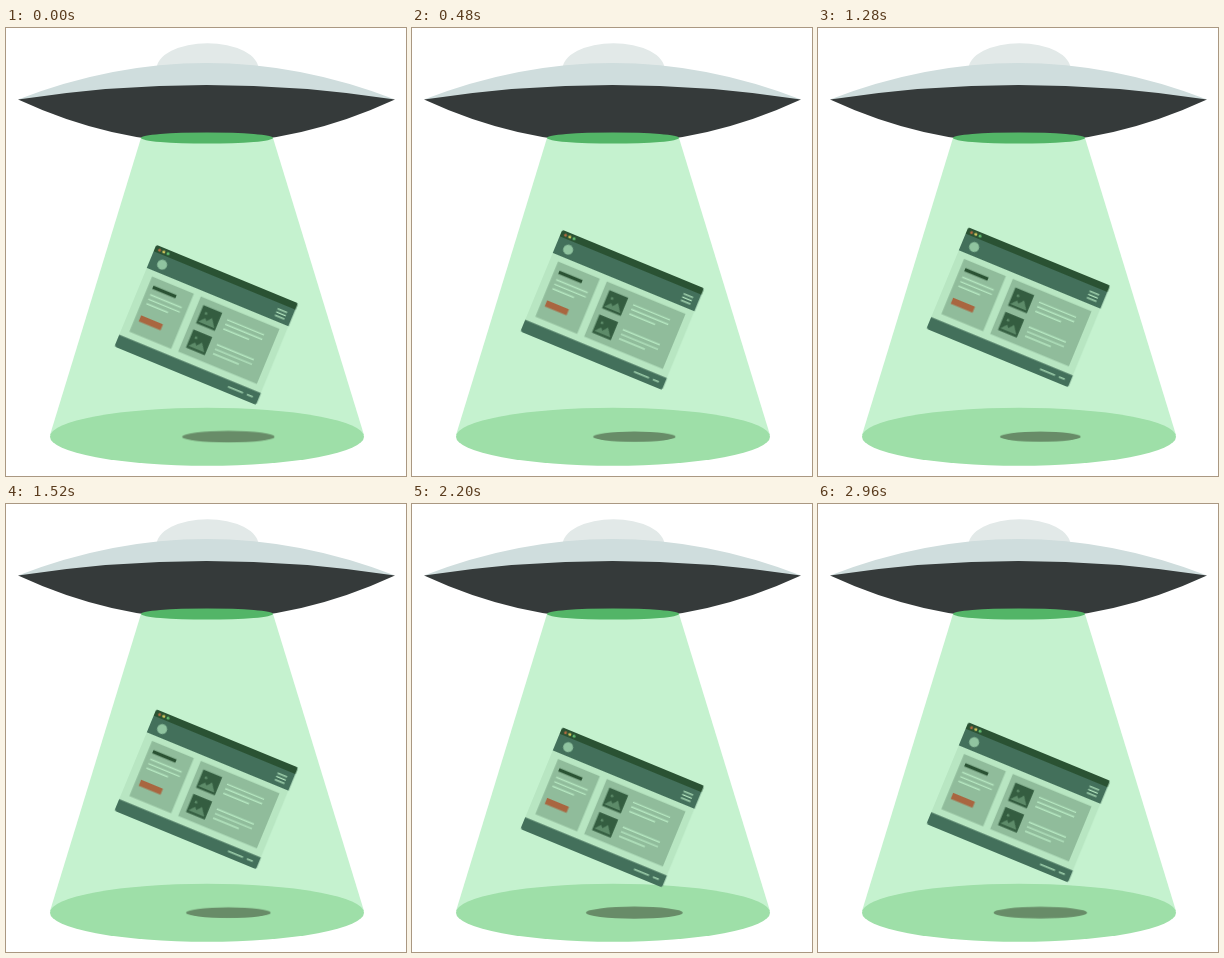
Animation, 400 px wide and 448 px high, one loop 3 s. Source, as an HTML page:

```html
<!DOCTYPE html>
<html lang="en">
<head>
<meta charset="utf-8">
<title>Abducted web page</title>
<style>
  html, body { margin: 0; width: 100%; height: 100%; overflow: hidden; background: #fff; }
  svg { display: block; width: 400px; height: 448px; }

  .float, .shadow {
    animation: 3000ms cubic-bezier(.5, 0, .5, 1) -540ms infinite;
  }
  .float { animation-name: float; }
  .shadow { animation-name: shrink; transform-origin: 222.4px 408.7px; }

  /* rise, sink slightly faster, rest briefly at the bottom */
  @keyframes float {
    0%, 96.667%, 100% { transform: translateY(0); }
    50% { transform: translateY(-27px); }
  }
  @keyframes shrink {
    0%, 96.667%, 100% { transform: scale(1); }
    50% { transform: scale(.815); }
  }

  .dark { fill: #2a5233; }
  .bar { fill: #43705b; }
  .panel { fill: #90bc9b; }
  .line { fill: none; stroke: #b6e8c1; stroke-width: 1.4; }
</style>
</head>
<body>
<svg viewBox="0 0 400 448">
  <defs>
    <clipPath id="frame"><rect width="153.5" height="110" rx="2.5"/></clipPath>
    <g id="picture">
      <rect width="20.3" height="19.6" fill="#345d40"/>
      <circle cx="5.6" cy="6.8" r="1.4" fill="#5d8b69"/>
      <path d="M1.5 17.2L6.5 11.5L9 13.8L13 8.8L18.8 17.2Z" fill="#5d8b69"/>
    </g>
  </defs>

  <path d="M135 110H267L358 407H44Z" fill="#c5f2cf"/>
  <ellipse cx="201" cy="408.7" rx="157" ry="29" fill="#9edfa8"/>
  <ellipse class="shadow" cx="222.4" cy="408.7" rx="48.6" ry="6.1" fill="#688c68"/>

  <ellipse cx="201.5" cy="41" rx="51" ry="25.7" fill="#e2e9e8"/>
  <path d="M12 71.5Q200.5 -1.5 389 71.5Z" fill="#cfdddd"/>
  <path d="M12 71.5Q200.5 42.5 389 71.5Q200.5 158.5 12 71.5Z" fill="#353a3a"/>
  <ellipse cx="201" cy="110" rx="66" ry="5.6" fill="#53b567"/>

  <g class="float">
    <g transform="translate(150.3 223.8) rotate(22.4)">
      <g clip-path="url(#frame)">
        <rect width="153.5" height="110" fill="#b8e6c2"/>
        <rect class="bar" width="153.5" height="25"/>
        <rect class="dark" width="153.5" height="7"/>
        <rect class="bar" y="97.3" width="153.5" height="13"/>
      </g>
      <circle cx="5.1" cy="3.7" r="1.5" fill="#b0693f"/>
      <circle cx="9.7" cy="3.7" r="1.5" fill="#cfc45c"/>
      <circle cx="14.3" cy="3.7" r="1.5" fill="#62bd70"/>

      <circle cx="13" cy="16.3" r="5" fill="#90c4a0"/>
      <path class="line" d="M136.5 12.9h10.3M136.5 16.4h10.3M136.5 19.9h10.3"/>

      <rect class="panel" x="8.2" y="30.9" width="45.2" height="59.7"/>
      <rect class="dark" x="13" y="38.8" width="25" height="3.5"/>
      <path class="line" d="M13.4 48.5h34M13.4 53.4h34M13.4 58.3h23.2"/>
      <rect x="12.9" y="71" width="23.6" height="6.5" fill="#a96640"/>

      <rect class="panel" x="60.9" y="30.8" width="85.1" height="59.6"/>
      <use href="#picture" x="66.6" y="37.8"/>
      <use href="#picture" x="66.6" y="64.1"/>
      <path class="line" d="M94 42.4h40M94 47.3h40M94 52.2h27.8M94 69.2h40M94 74.1h40M94 79h27.8"/>

      <path class="line" d="M120.4 103.9h16.2M140.8 103.9h6.4"/>
    </g>
  </g>
</svg>
</body>
</html>
```
